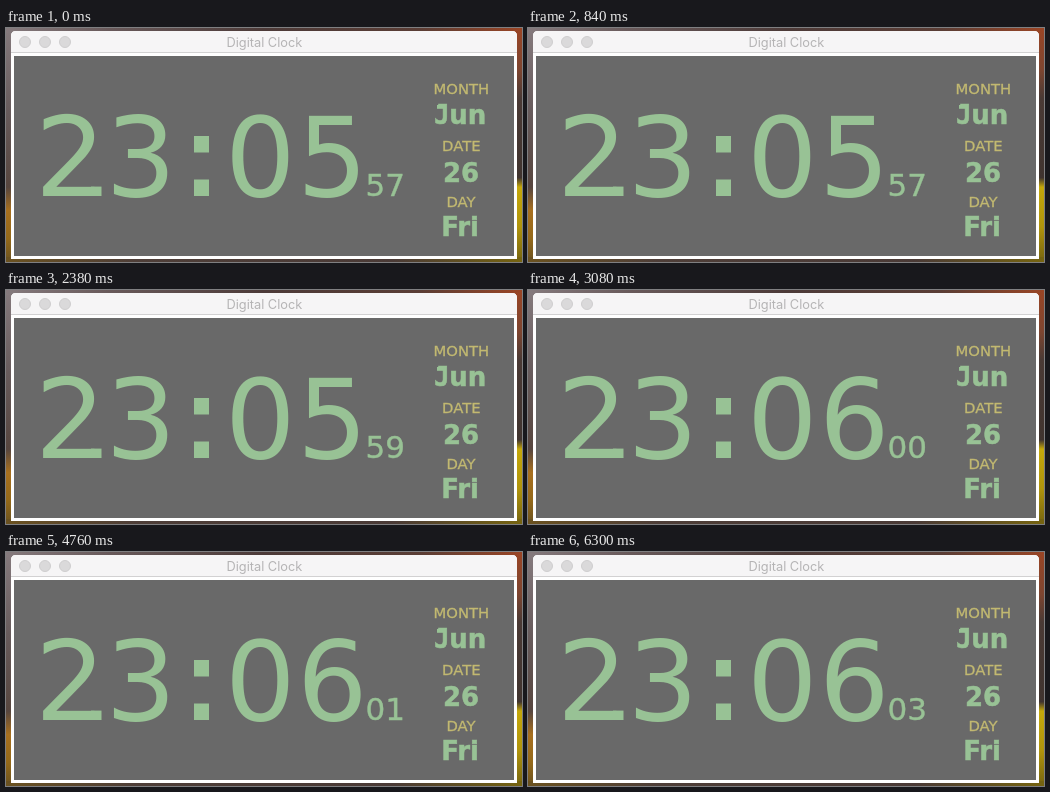
An HTML page for the animation above (6.37 s loop, 516x234 px).

```html
<!DOCTYPE html>
<html lang="en">
<head>
<meta charset="utf-8">
<title>Digital Clock</title>
<style>
  html, body { margin: 0; width: 100%; height: 100%; overflow: hidden; background: #493936; }
  svg { display: block; width: 516px; height: 234px; }
  .clock { font-family: "DejaVu Sans", Verdana, sans-serif; fill: #98c295; stroke: #98c295; stroke-width: 0; }
  .hours { font-size: 111px; }
  .seconds { font-size: 31px; stroke-width: .4; }
  .label { font-size: 14.8px; fill: #c2b971; stroke: #c2b971; stroke-width: .3; text-anchor: middle; }
  .value { font-size: 26px; font-weight: bold; stroke-width: .5; }
  .initial { font-family: "DejaVu Sans Mono", monospace; }
  .title { font: 12.8px Inter, sans-serif; fill: #b5b4b5; text-anchor: middle; }
</style>
</head>
<body>
<svg viewBox="0 0 516 234">
  <defs>
    <linearGradient id="left" x2="0" y2="1">
      <stop offset="0" stop-color="#857a7d"/>
      <stop offset=".35" stop-color="#685c5d"/>
      <stop offset=".68" stop-color="#57463f"/>
      <stop offset=".78" stop-color="#a8701f"/>
      <stop offset=".9" stop-color="#94691a"/>
      <stop offset="1" stop-color="#6b5220"/>
    </linearGradient>
    <linearGradient id="right" x2="0" y2="1">
      <stop offset="0" stop-color="#9a4525"/>
      <stop offset=".18" stop-color="#7d4530"/>
      <stop offset=".3" stop-color="#4a3a35"/>
      <stop offset=".64" stop-color="#40342f"/>
      <stop offset=".68" stop-color="#c4a80a"/>
      <stop offset=".85" stop-color="#b0940c"/>
      <stop offset="1" stop-color="#766410"/>
    </linearGradient>
    <linearGradient id="top">
      <stop offset="0" stop-color="#857a7d"/>
      <stop offset=".2" stop-color="#68595a"/>
      <stop offset=".5" stop-color="#4c3a38"/>
      <stop offset=".8" stop-color="#5a3d35"/>
      <stop offset="1" stop-color="#9a4525"/>
    </linearGradient>
    <linearGradient id="bottom">
      <stop offset="0" stop-color="#6b5220"/>
      <stop offset=".25" stop-color="#4e3e38"/>
      <stop offset=".75" stop-color="#4a3a36"/>
      <stop offset="1" stop-color="#766410"/>
    </linearGradient>
  </defs>

  <rect width="12" height="234" fill="url(#left)"/>
  <rect x="504" width="12" height="234" fill="url(#right)"/>
  <rect width="516" height="5" fill="url(#top)"/>
  <rect y="229" width="516" height="5" fill="url(#bottom)"/>

  <path d="M5 231V8q0-5 5-5H506q5 0 5 5V231z" fill="#fff"/>
  <path d="M5 25V8q0-5 5-5H506q5 0 5 5V25z" fill="#f6f5f6"/>
  <rect x="5" y="24" width="506" height="1" fill="#d2d1d2"/>
  <g fill="#dad9da" stroke="#cfcecf">
    <circle cx="19" cy="14" r="5.5"/>
    <circle cx="39" cy="14" r="5.5"/>
    <circle cx="59" cy="14" r="5.5"/>
  </g>
  <text class="title" x="258.4" y="19">Digital Clock</text>
  <rect x="8" y="28" width="500" height="200" fill="#696969"/>

  <g class="clock">
    <g class="hours">
      <text x="29 99.5" y="168">23</text>
      <path d="M85 158.6h10.5v9.4h-10.5z"/>
      <path d="M188 108h15v16.5h-15zM188 151.5h15v16.5h-15z"/>
      <text id="minutes" x="219 291" y="168">05</text>
    </g>
    <text id="seconds" class="seconds" x="359.5" y="168">57</text>

    <text class="label" x="455.3" y="65.6">MONTH</text>
    <text class="value initial" x="428" y="96">J</text>
    <path d="M431 77h7v3.8h-7z"/>
    <text class="value" x="443.3" y="96">un</text>
    <text class="label" x="455.3" y="122.6">DATE</text>
    <text class="value" x="455" y="153.5" text-anchor="middle">26</text>
    <text class="label" x="455" y="178.6">DAY</text>
    <text class="value" x="435.2" y="207.5">Fri</text>
  </g>
</svg>
<script>
  const LOOP = 6370;
  const TICKS = [1050, 2030, 3010, 4060, 5040, 6020];
  const START = 5 * 60 + 57;
  const pad = n => String(n).padStart(2, "0");
  const minutes = document.getElementById("minutes");
  const seconds = document.getElementById("seconds");

  function setText(node, text) {
    if (node.textContent !== text) node.textContent = text;
  }

  function draw() {
    const time = performance.now() % LOOP;
    const total = START + TICKS.filter(tick => tick <= time).length;
    setText(minutes, pad(Math.floor(total / 60)));
    setText(seconds, pad(total % 60));
    requestAnimationFrame(draw);
  }
  draw();
</script>
</body>
</html>
```
